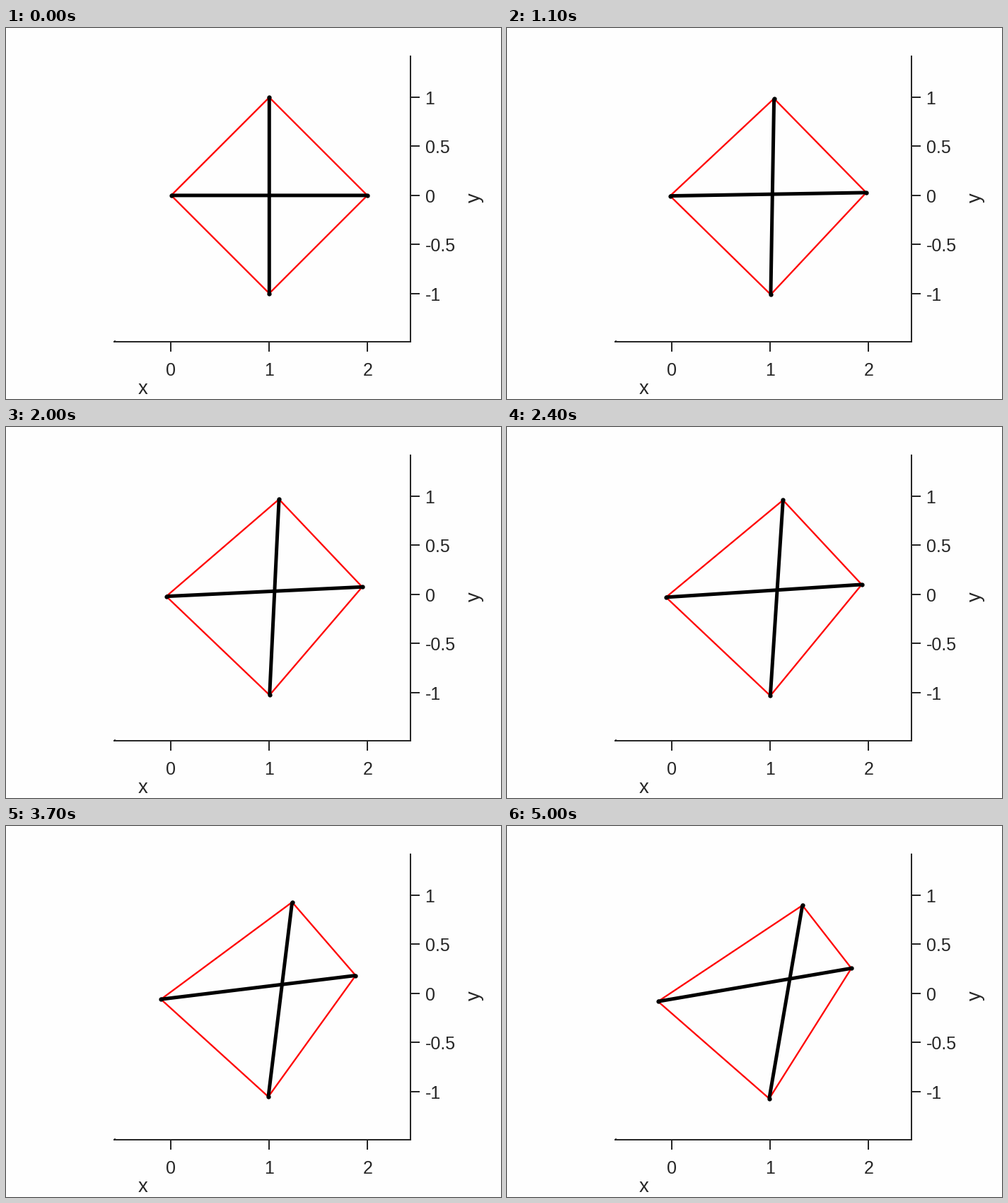
Recreate the animation shown at these times as a matplotlib script. Size 700 by 525 pixels, loop 5.1 s.

```python
import numpy as np
import matplotlib.pyplot as plt
from matplotlib.animation import FuncAnimation

W, H, DPI = 700, 525, 100
FRAMES, INTERVAL = 51, 100
PT = 72 / DPI                      # points per pixel
UNIT = 138.9                       # pixels per data unit
CX, CY = 372.3, 236.9              # pixel position of data point (1, 0)
HALF = 138.7                       # half of a bar's length
INK = "#262626"

plt.rcParams["font.family"] = "Liberation Sans"

fig = plt.figure(figsize=(W / DPI, H / DPI), dpi=DPI, facecolor="#fefefe")
ax = fig.add_axes([0, 0, 1, 1])
ax.set_xlim(0, W)
ax.set_ylim(H, 0)
ax.axis("off")


def line(xs, ys, width, color, **kw):
    return ax.plot(xs, ys, color=color, lw=width * PT, **kw)[0]


def label(x, y, text, size, **kw):
    ax.text(x, y, text, fontsize=size * PT, color=INK, va="baseline", **kw)


def draw_axes():
    line([152, 572, 572], [444, 444, 39], 2, INK,
         solid_joinstyle="miter", solid_capstyle="butt")
    line([152.5, 155], [443, 443], 1.5, INK, solid_capstyle="butt")
    for value in (0, 1, 2):
        x = CX + (value - 1) * UNIT
        line([x, x], [444, 458], 2, INK, solid_capstyle="butt")
        label(x, 492, str(value), 25, ha="center")
    for value in (-1, -0.5, 0, 0.5, 1):
        y = CY - value * UNIT
        line([572, 585], [y, y], 2, INK, solid_capstyle="butt")
        label(592.5, y + 10, f"{value:g}", 25, ha="left")
    label(193.5, 517.5, "x", 27.5, ha="center")
    label(670, 240.5, "y", 27.5, ha="center", rotation=90,
          rotation_mode="anchor")


def pose(t):
    """End points of the flat bar and the upright bar at step t."""
    tilt = t**2 * (1.63e-4 - 2.3e-6 * t + 8e-9 * t**2)
    drift = 0.5 * (t - 6 * (1 - np.exp(-t / 6)))
    shift = drift * np.array([1, 0.55])
    center = np.array([CX, CY])
    along = HALF * np.array([np.cos(tilt), -np.sin(tilt)])
    up = HALF * np.array([np.sin(tilt), -np.cos(tilt)])
    flat, upright = center - shift, center + shift
    return flat - along, flat + along, upright + up, upright - up


draw_axes()
strings = line([], [], 2.3, "red", snap=False, solid_joinstyle="round")
bars = [line([], [], 5, "black", snap=False, solid_capstyle="butt")
        for _ in range(2)]
dots = line([], [], 0, "black", ls="none", marker="o",
            ms=6.3 * PT, mew=0, snap=False)


def update(i):
    left, right, top, bottom = pose(i)
    strings.set_data(*np.array([left, top, right, bottom, left]).T)
    bars[0].set_data(*np.array([left, right]).T)
    bars[1].set_data(*np.array([top, bottom]).T)
    dots.set_data(*np.array([left, right, top, bottom]).T)
    return [strings, *bars, dots]


anim = FuncAnimation(fig, update, frames=FRAMES, interval=INTERVAL,
                     repeat=True, repeat_delay=0)
plt.show()
```
